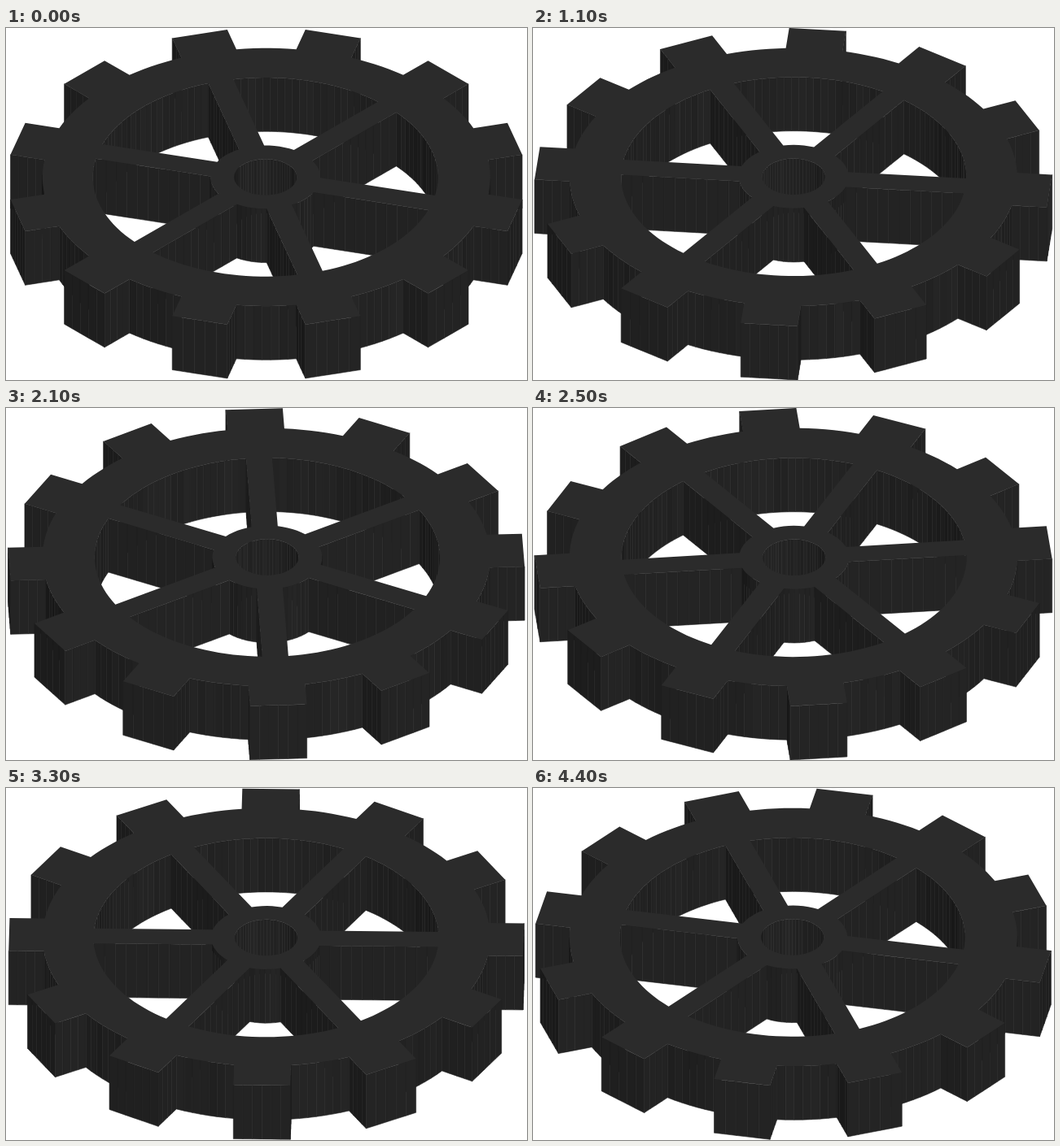
An HTML page with a canvas that plays this animation: 640 by 433 pixels, repeating every 4500 ms.

```html
<!DOCTYPE html>
<html lang="en">
<head>
<meta charset="utf-8">
<title>Turning gear</title>
<style>
  html, body { margin: 0; width: 100%; height: 100%; overflow: hidden; background: #fff; }
  canvas { display: block; width: 640px; height: 433px; }
</style>
</head>
<body>
<canvas id="stage" width="640" height="433"></canvas>
<script>
const ctx = document.getElementById('stage').getContext('2d');
const RAD = Math.PI / 180;
const LOOP = 4500, STEP = 100;
const CX = 319.8, CY = 183.4, TILT = 0.577, DEPTH = 66.2;
const TIP = 316, RIM = 275, INNER = 212, HUB = 67.5, BORE = 38.5;
const TOOTH = 35, SPOKE = 16;

// [step, degrees turned]
const TURN = [[0, 15], [5, 65.4], [11, 125.4], [21, 207.3], [28, 254.6],
  [33, 301], [44, 371.5], [45, 375]];

const polar = (r, deg) => [r * Math.cos(deg * RAD), r * Math.sin(deg * RAD)];
const spread = (half, r) => Math.asin(half / r) / RAD;
const hash = n => { const v = Math.sin(n * 12.9898) * 43758.5453; return v - Math.floor(v); };

function arc(r, from, to) {
  const n = Math.ceil(Math.abs(to - from) / (r < 100 ? 6 : 2.5));
  return Array.from({ length: n + 1 }, (_, i) => polar(r, from + (to - from) * i / n));
}

function outline() {
  const pts = [], d = spread(TOOTH, RIM);
  const tipR = Math.hypot(TIP, TOOTH), tipD = Math.atan2(TOOTH, TIP) / RAD;
  for (let a = 0; a < 360; a += 30) {
    pts.push(polar(tipR, a - tipD), polar(tipR, a + tipD), ...arc(RIM, a + d, a + 30 - d));
  }
  return pts;
}

function opening(a) {
  const o = spread(SPOKE, INNER), i = spread(SPOKE, HUB);
  return [...arc(INNER, a + 60 - o, a + o), ...arc(HUB, a + i, a + 60 - i)];
}

// The inner parts sit slightly off the axis.
const shift = pts => pts.map(([x, y]) => [x - 1.1, y + 0.3]);
const loops = [outline(), shift(arc(BORE, 360, 0))];
for (let a = 0; a < 360; a += 60) loops.push(shift(opening(a)));

// Split every edge into short wall panels; curved panels get faint streaks.
const panels = [];
for (const loop of loops) {
  loop.forEach((p, i) => {
    const q = loop[(i + 1) % loop.length];
    const len = Math.hypot(q[0] - p[0], q[1] - p[1]);
    const n = Math.max(1, Math.ceil(len / 14));
    const tint = len < 20 ? (hash(panels.length + 1) - 0.5) * 4 : 0;
    const at = k => [p[0] + (q[0] - p[0]) * k / n, p[1] + (q[1] - p[1]) * k / n];
    for (let k = 0; k < n; k++) panels.push({ p: at(k), q: at(k + 1), tint });
  });
}

function turnAt(step) {
  const i = TURN.findIndex(k => k[0] > step);
  const [s0, a0] = TURN[i - 1], [s1, a1] = TURN[i];
  return a0 + (a1 - a0) * (step - s0) / (s1 - s0);
}

function shade(dx, dy, tint) {
  const normal = Math.atan2(-dx, dy);
  const v = Math.round(26 + 10 * Math.max(0, Math.cos(normal - 70 * RAD)) + tint);
  return `rgb(${v},${v},${v})`;
}

function draw(step) {
  const a = turnAt(step) * RAD, c = Math.cos(a), s = Math.sin(a);
  const project = ([x, y]) => [CX + x * c - y * s, CY + (x * s + y * c) * TILT];

  ctx.fillStyle = '#fff';
  ctx.fillRect(0, 0, 640, 433);

  const walls = panels
    .map(({ p, q, tint }) => ({ p: project(p), q: project(q), tint }))
    .filter(({ p, q }) => q[0] < p[0])
    .sort((u, v) => u.p[1] + u.q[1] - v.p[1] - v.q[1]);
  ctx.lineWidth = 0.6;
  ctx.lineJoin = 'round';
  for (const { p, q, tint } of walls) {
    ctx.beginPath();
    ctx.moveTo(p[0], p[1]);
    ctx.lineTo(q[0], q[1]);
    ctx.lineTo(q[0], q[1] + DEPTH);
    ctx.lineTo(p[0], p[1] + DEPTH);
    ctx.closePath();
    ctx.fillStyle = ctx.strokeStyle = shade(q[0] - p[0], (q[1] - p[1]) / TILT, tint);
    ctx.fill();
    ctx.stroke();
  }

  ctx.beginPath();
  for (const loop of loops) {
    loop.forEach((pt, i) => ctx[i ? 'lineTo' : 'moveTo'](...project(pt)));
    ctx.closePath();
  }
  ctx.fillStyle = '#2b2b2b';
  ctx.fill('evenodd');
}

function tick() {
  draw(Math.floor(performance.now() % LOOP / STEP));
  requestAnimationFrame(tick);
}
tick();
</script>
</body>
</html>
```
